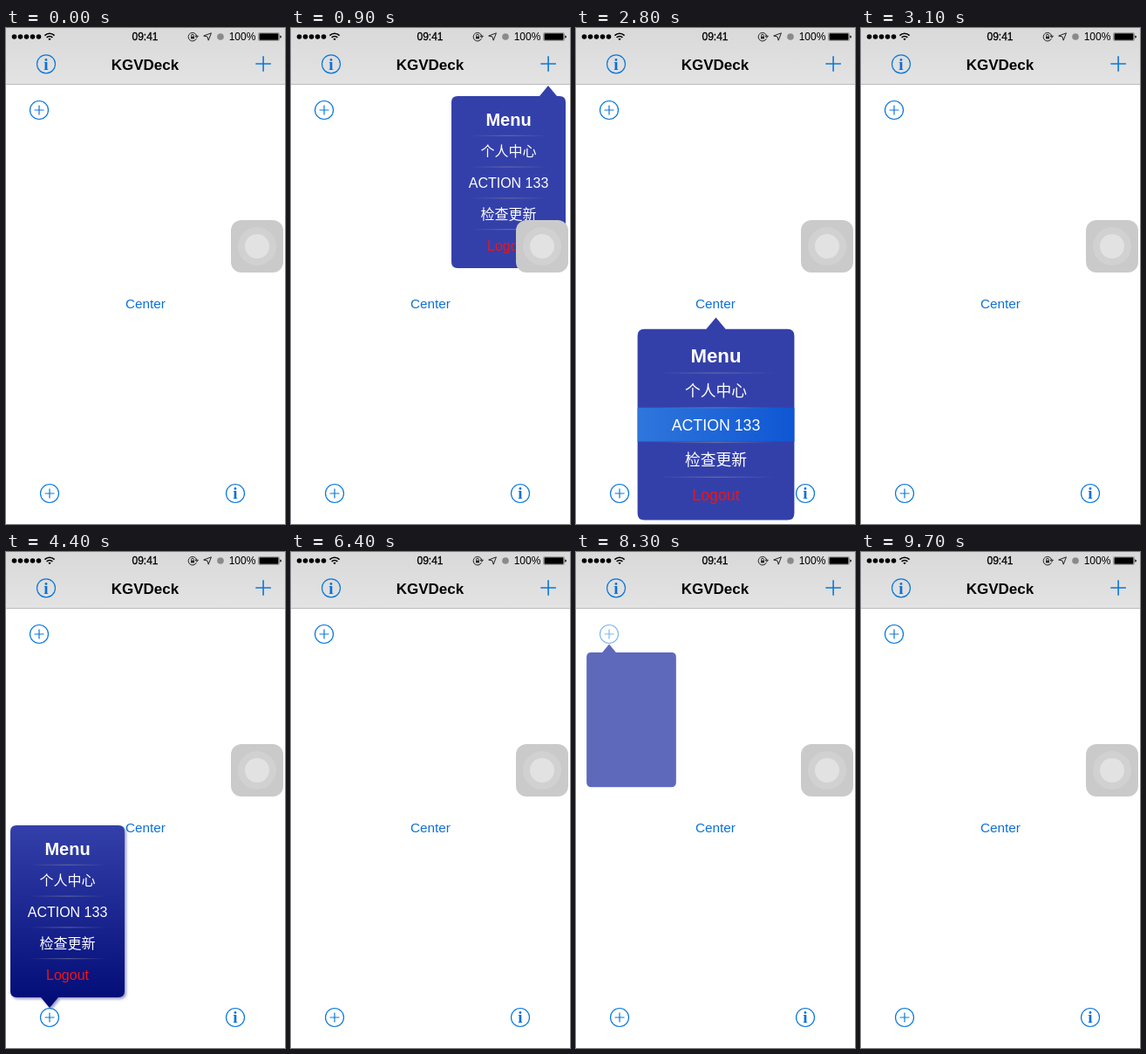
An HTML page that plays this animation: 320 by 568 pixels, repeating every 10 s.

```html
<!DOCTYPE html>
<html lang="en">
<head>
<meta charset="utf-8">
<title>Popup menus</title>
<style>
html, body { margin: 0; width: 100%; height: 100%; overflow: hidden; background: #fff; }
svg { display: block; width: 320px; height: 568px; font-family: "Liberation Sans", Arial, "Noto Sans CJK SC", "Noto Sans CJK", sans-serif; }
text { text-anchor: middle; }
.line { fill: none; stroke: #0a78dc; stroke-width: 1.2; }
.blue { fill: #0a70d8; }
.info { font: bold 19px "Liberation Serif", Times, serif; }
.status { font-size: 12px; }
.bold { stroke: #000; stroke-width: .3; }
</style>
</head>
<body>
<svg viewBox="0 0 320 568">
  <defs>
    <linearGradient id="bar" x2="0" y2="1">
      <stop stop-color="#d9d9d9"/><stop offset="1" stop-color="#e3e3e3"/>
    </linearGradient>
    <linearGradient id="deep" x2="0" y2="1">
      <stop stop-color="#3440aa"/><stop offset="1" stop-color="#010b76"/>
    </linearGradient>
    <linearGradient id="pick">
      <stop stop-color="#2f76dc"/><stop offset="1" stop-color="#0f56d4"/>
    </linearGradient>
    <linearGradient id="rule">
      <stop stop-color="#7c82a0" stop-opacity="0"/>
      <stop offset=".5" stop-color="#7c82a0" stop-opacity=".75"/>
      <stop offset="1" stop-color="#7c82a0" stop-opacity="0"/>
    </linearGradient>
    <g id="plus"><circle class="line" r="10.5"/><path class="line" d="M-5.5 0H5.5M0-5.5V5.5"/></g>
    <g id="info"><circle class="line" r="10.5"/><text class="info blue" y="6.4">i</text></g>
  </defs>

  <rect width="320" height="64" fill="url(#bar)"/>
  <rect y="64" width="320" height="1" fill="#bcbcbc"/>

  <!-- status bar -->
  <path d="M9.5 10h28.1" stroke="#000" stroke-width="5.6" stroke-linecap="round" stroke-dasharray="0 7"/>
  <g fill="none" stroke="#000" stroke-width="1.6">
    <path d="M44.4 8.6a8 8 0 0 1 11.2 0M46.6 10.9a5 5 0 0 1 6.8 0"/>
    <path d="M50 14.2l-1.6-1.8a2.4 2.4 0 0 1 3.2 0z" fill="#000" stroke="none"/>
  </g>
  <text class="status bold" x="159.5" y="14.3">09:41</text>
  <g fill="none" stroke="#222">
    <path d="M218.3 12.2A4.8 4.8 0 1 1 218.6 9M217 9.2h3.4l-1.7 2z"/>
    <path d="M212.5 9.5V8.7a1.4 1.4 0 0 1 2.8 0v.8"/>
    <rect x="212" y="9.6" width="4" height="2.8" fill="#222" stroke="none"/>
    <path d="M235.4 5.8l-3.2 8.4-1.2-4.2-4.3-1z"/>
  </g>
  <circle cx="246" cy="10" r="3.8" fill="#8a8a8a"/>
  <text class="status" x="271" y="14.3">100%</text>
  <rect x="289.5" y="5.5" width="24" height="9" rx="1.2" fill="none" stroke="#777" stroke-width=".6"/>
  <rect x="290.5" y="6.3" width="22" height="7.4" rx=".6"/>
  <path d="M314.3 8.4a1.6 1.6 0 0 1 0 3.2z"/>

  <text x="159.5" y="48" font-size="17" font-weight="bold">KGVDeck</text>
  <use href="#info" x="46" y="41.3"/>
  <path id="add" class="line" style="stroke-width:1.6" d="M286.3 41h17.6M295.1 32.2v17.6"/>
  <use id="top" href="#plus" x="38" y="94"/>
  <text id="mid" class="blue" x="160" y="321" font-size="15.3">Center</text>
  <use id="left" href="#plus" x="50" y="533"/>
  <use id="right" href="#info" x="263" y="533"/>

  <g id="menu"></g>

  <!-- floating button -->
  <rect x="258" y="220" width="60" height="60" rx="12" fill="#cacaca"/>
  <circle cx="288" cy="250" r="22" fill="#d1d1d1"/>
  <circle cx="288" cy="250" r="14" fill="#e2e2e2"/>
</svg>
<script>
const LOOP = 10000, STEP = 100, GROW = 200;
const H = 197, ARROW = 12, ROW = 35.8;
const LABELS = ['Menu', '个人中心', 'ACTION 133', '检查更新', 'Logout'];

// x, y: arrow tip; dx: from the tip to the panel's left edge; pick: when a row lights up
const MENUS = [
  { id: 'add', x: 295, y: 66, dx: -111, w: 131, open: 560, pick: 1100, close: 1200 },
  { id: 'mid', x: 160.5, y: 331.5, dx: -81, w: 162, open: 1960, pick: 2800, close: 2900, size: 1.11 },
  { id: 'left', x: 50, y: 522, dx: -45, w: 131, open: 3760, close: 5600, up: true, fill: 'url(#deep)', shadow: true },
  { id: 'right', x: 263, y: 518, dx: -79, w: 131, open: 6460, pick: 7400, close: 7500, up: true },
  { id: 'top', x: 38, y: 105.5, dx: -33, w: 131, open: 8160, close: 9300 }
];

const $ = id => document.getElementById(id);
const clamp = v => Math.max(0, Math.min(1, v));
const ease = v => v * v * (3 - 2 * v);

function panel(m) {
  const base = m.up ? -ARROW : ARROW, top = m.up ? base - H : base;
  const r = 7, x0 = m.dx, x1 = x0 + m.w, y1 = top + H;
  const notch = (on, half) => on ? `L${-half} ${base}L0 0L${half} ${base}` : '';
  const d = `M${x0 + r} ${top}${notch(!m.up, 10)}H${x1 - r}Q${x1} ${top} ${x1} ${top + r}` +
    `V${y1 - r}Q${x1} ${y1} ${x1 - r} ${y1}${notch(m.up, -10)}H${x0 + r}` +
    `Q${x0} ${y1} ${x0} ${y1 - r}V${top + r}Q${x0} ${top} ${x0 + r} ${top}Z`;
  const shade = m.shadow ? 'style="filter:drop-shadow(2px 2px 1.5px #010b7666)"' : '';
  return `<path d="${d}" fill="${m.fill || '#3440aa'}" ${shade}/>`;
}

function rows(m, lit) {
  const top = m.up ? -ARROW - H : ARROW, mid = m.dx + m.w / 2;
  let out = lit ? `<rect x="${m.dx}" y="${top + 81}" width="${m.w}" height="35" fill="url(#pick)"/>` : '';
  LABELS.forEach((label, i) => {
    const font = i ? 'font-size="16"' : 'font-size="20" font-weight="bold"';
    const y = top + (i ? 33.5 + i * ROW : 34);
    out += `<text x="${mid}" y="${y}" ${font} fill="${i < 4 ? '#fff' : '#f01414'}">${label}</text>`;
    if (i) out += `<rect x="${m.dx + 22}" y="${top + 9 + i * ROW}" width="${m.w - 43}" height="1" fill="url(#rule)"/>`;
  });
  return out;
}

function draw(t) {
  let out = '';
  for (const m of MENUS) {
    const tap = m.open + 40;
    $(m.id).style.opacity = t < tap ? 1 : clamp(.27 + (t - tap) / 400);
    if (t < m.open || t >= m.close + GROW) continue;
    const e = ease(clamp((t - m.open) / GROW)) * (1 - ease(clamp((t - m.close) / GROW)));
    const full = e === 1;
    out = `<g transform="translate(${m.x} ${m.y}) scale(${e * (m.size || 1)})" opacity="${e}">` +
      panel(m) + (full ? rows(m, t >= m.pick) : '') + '</g>';
  }
  $('menu').innerHTML = out;
}

const start = performance.now();
let last = -1;
function tick() {
  const t = Math.floor((performance.now() - start) % LOOP / STEP) * STEP;
  if (t !== last) draw(last = t);
  requestAnimationFrame(tick);
}
tick();
</script>
</body>
</html>
```
